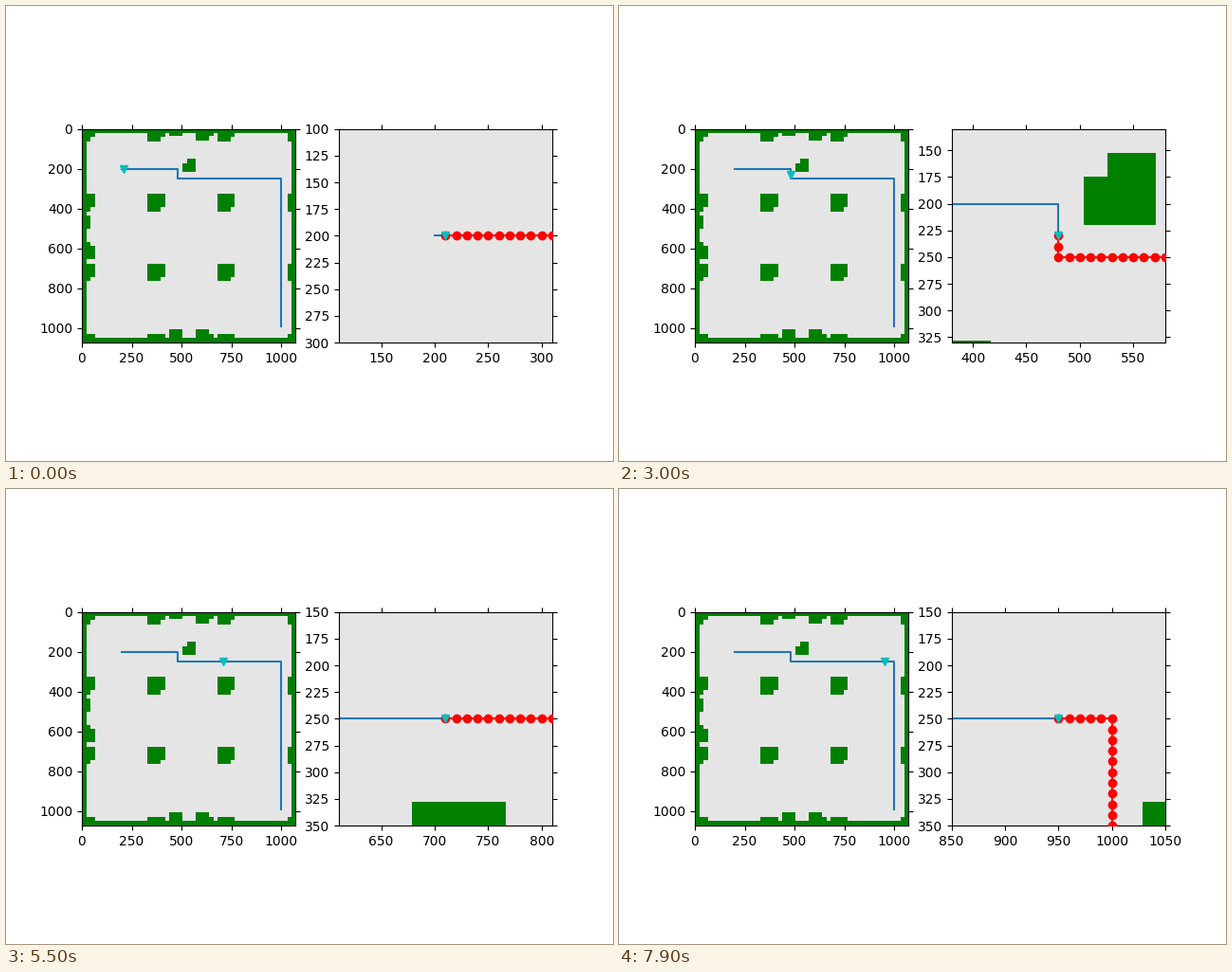
Animation, 640 px wide and 480 px high, one loop 8 s. Source, as a matplotlib script:

```python
import numpy as np
import matplotlib.pyplot as plt
from matplotlib.animation import FuncAnimation
from matplotlib.colors import ListedColormap

SIZE, CELL, PITCH = 1072, 22, 350
FRAMES, STEP, VIEW = 80, 10, 100

grid = np.zeros((SIZE, SIZE))


def fill(x0, y0, x1, y1):
    grid[max(y0, 0):max(y1, 0), max(x0, 0):max(x1, 0)] = 1


def build_map():
    # outer wall
    fill(0, 0, SIZE, CELL)
    fill(0, SIZE - CELL, SIZE, SIZE)
    fill(0, 0, CELL, SIZE)
    fill(SIZE - CELL, 0, SIZE, SIZE)
    # pillars with a missing lower right corner
    for i in range(4):
        for j in range(4):
            x, y = i * PITCH - CELL, j * PITCH - CELL
            fill(x, y, x + 4 * CELL, y + 3 * CELL)
            fill(x, y, x + 3 * CELL, y + 4 * CELL)
    # door posts
    fill(437, 0, 504, 40)
    fill(571, 0, 658, 40)
    fill(571, 0, 637, 64)
    fill(0, 437, 44, 504)
    fill(0, 568, 44, 592)
    fill(0, 590, 66, 656)
    fill(437, 1006, 504, SIZE)
    fill(571, 1006, 637, SIZE)
    fill(571, 1028, 658, SIZE)
    # free-standing obstacle
    fill(525, 153, 570, 220)
    fill(503, 175, 570, 220)


def make_path(corners):
    points = [corners[0]]
    for a, b in zip(corners, corners[1:]):
        a, b = np.array(a), np.array(b)
        n = int(abs(b - a).max()) // STEP
        points += [tuple(a + (b - a) * k // n) for k in range(1, n + 1)]
    return np.array(points)


build_map()
path = make_path([(200, 200), (480, 200), (480, 250), (1000, 250), (1000, 990)])

fig, axes = plt.subplots(1, 2, figsize=(6.4, 4.8), dpi=100)
cmap = ListedColormap(["#e5e5e5", "#008000"])
robots = []
for ax in axes:
    ax.imshow(grid, cmap=cmap, vmin=0, vmax=1, interpolation="nearest",
              extent=(0, SIZE, SIZE, 0))
    ax.plot(*path.T, color="C0")
    ax.xaxis.set_ticks_position("both")
    ax.yaxis.set_ticks_position("both")
    robots.append(ax.plot([], [], "cv", zorder=4)[0])

full, local = axes
full.set_xlim(0, SIZE)
full.set_ylim(SIZE, 0)
ahead, = local.plot([], [], "ro-", zorder=3)


def update(frame):
    k = frame + 1
    x, y = path[k]
    for robot in robots:
        robot.set_data([x], [y])
    ahead.set_data(*path[k:].T)
    local.set_xlim(x - VIEW, x + VIEW)
    local.set_ylim(y + VIEW, y - VIEW)
    return [*robots, ahead]


anim = FuncAnimation(fig, update, frames=FRAMES, interval=100,
                     init_func=lambda: update(0), repeat=True, repeat_delay=0)
plt.show()
```
